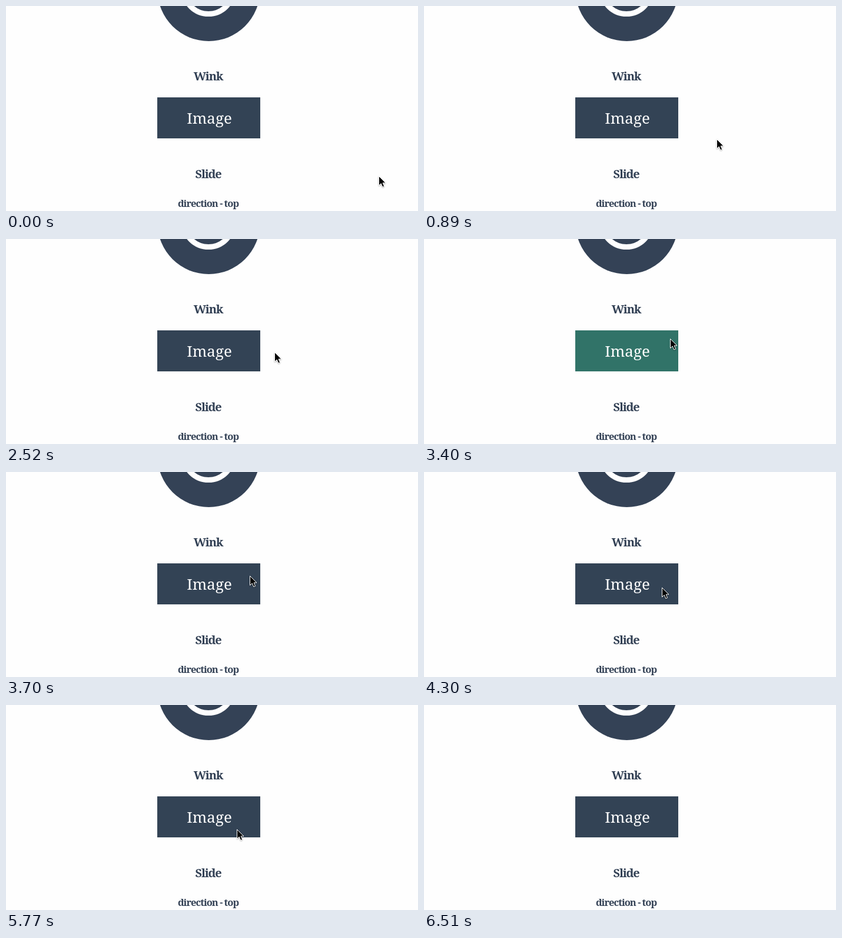
Recreate the animation shown at these times as an HTML page. Size 700x350 px, loop 7370 ms.

```html
<!DOCTYPE html>
<html lang="en">
<head>
<meta charset="utf-8">
<title>Wink</title>
<style>
  html, body { margin: 0; width: 100%; height: 100%; overflow: hidden; background: #fefefe; }
  svg { display: block; }
  text { font: bold 20px "Noto Serif", serif; letter-spacing: -.06em; text-anchor: middle; fill: #344256; }
  .small { font-size: 16.5px; }
  .label { font-weight: normal; font-size: 26px; letter-spacing: 0; fill: #fff; }
  #cursor { filter: drop-shadow(0 1px 1px rgba(0, 0, 0, .35)); }
</style>
</head>
<body>
<svg width="700" height="350" viewBox="0 0 700 350">
  <circle cx="344.5" cy="-27" r="87" fill="#344256"/>
  <circle cx="344" cy="-28.5" r="42" fill="none" stroke="#fefefe" stroke-width="9"/>
  <text x="343.5" y="126.5">Wink</text>
  <rect id="button" x="257" y="156" width="175" height="70"/>
  <text class="label" x="345.5" y="201">Image</text>
  <text x="343.5" y="293.5">Slide</text>
  <text class="small" x="343.5" y="343">direction - top</text>
  <path id="cursor" d="M.5 .5V16.5L4.2 13 6.8 19 9.6 17.8 7.1 12H12Z" stroke="#fff"/>
</svg>
<script>
const LOOP = 7370, STEP = 148, LAST_STEP = 44;
const WINK = 300, winkStarts = [1310, 3334, 5037];
const dark = [51, 67, 85], green = [46, 170, 126];

// Turning points of the cursor, eased between
const stops = [
  { step: 0, x: 633, y: 290 },
  { step: 10, x: 423, y: 193 },
  { step: 14, x: 423, y: 193 },
  { step: 18, x: 462, y: 193 },
  { step: 23, x: 418, y: 170 },
  { step: 29, x: 404, y: 197 },
  { step: 32, x: 402, y: 248 },
  { step: 35, x: 388, y: 201 },
  { step: 38, x: 388, y: 198 },
  { step: 43, x: 422, y: 328 }
];
const button = document.getElementById('button');
const cursor = document.getElementById('cursor');

const mix = (a, b, p) => Math.round(a + (b - a) * p);
const smooth = p => p * p * (3 - 2 * p);

function cursorAt(step) {
  const i = Math.max(1, stops.findIndex(s => s.step >= step));
  const from = stops[i - 1], to = stops[i];
  const p = smooth((step - from.step) / (to.step - from.step));
  return [mix(from.x, to.x, p), mix(from.y, to.y, p)];
}

// Colour rises to green and falls back within one wink
function winkAt(time) {
  return Math.max(0, ...winkStarts.map(s => 1 - Math.abs((time - s) / WINK * 2 - 1)));
}

function draw(now) {
  const step = Math.min(LAST_STEP, Math.floor((now % LOOP + 4) / STEP));
  const amount = winkAt(step * STEP);
  button.setAttribute('fill', `rgb(${dark.map((c, i) => mix(c, green[i], amount))})`);
  const visible = step < LAST_STEP;
  cursor.setAttribute('visibility', visible ? 'visible' : 'hidden');
  if (visible) cursor.setAttribute('transform', `translate(${cursorAt(step)})`);
}

function tick() {
  draw(performance.now());
  requestAnimationFrame(tick);
}
tick();
</script>
</body>
</html>
```
